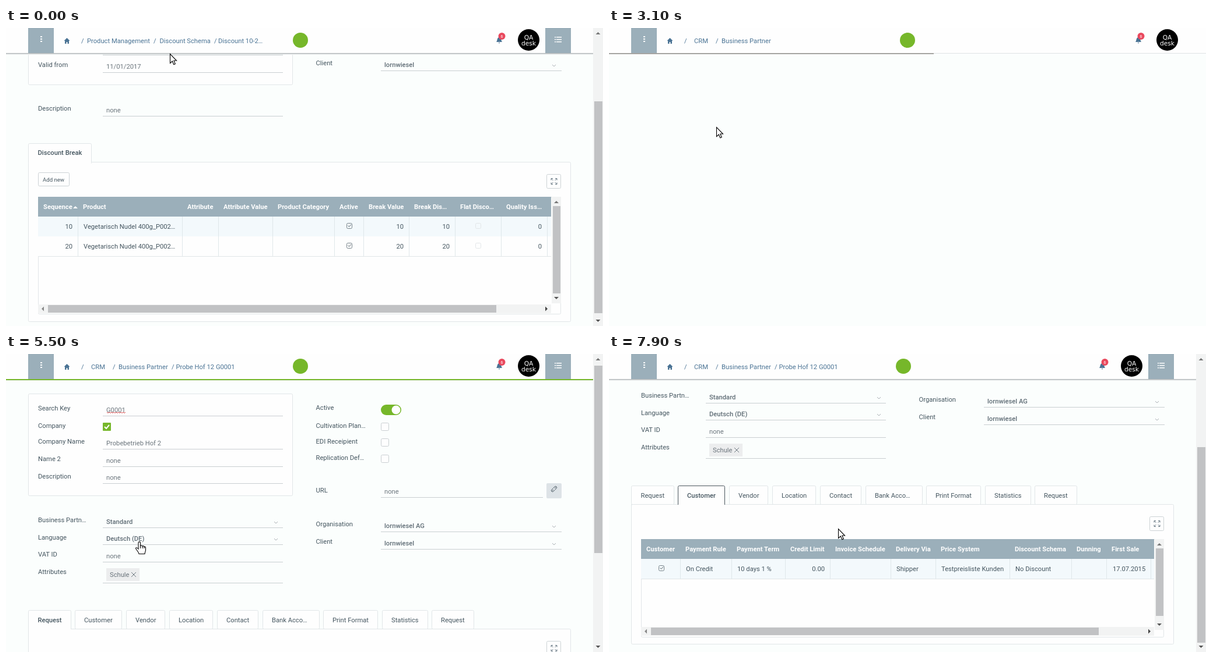
An HTML page that plays this animation: 1024x512 px, repeating every 8 s.

```html
<!DOCTYPE html>
<html lang="en">
<head>
<meta charset="utf-8">
<title>Business partner walkthrough</title>
<style>
html, body { margin: 0; width: 100%; height: 100%; overflow: hidden; background: #fbfefd; }
svg { display: block; width: 1024px; height: 512px; font: 11.2px Roboto, sans-serif; fill: #44555f; }
.bold { font-weight: 500; }
.head { font-weight: 700; fill: #fff; }
.value { fill: #6b757c; }
.pick { fill: #5f6c75; font-weight: 500; }
.link { fill: #4a7394; }
.title { font-weight: 500; fill: #66757f; }
.small { font-size: 9.6px; }
.tiny { font-size: 9px; }
.end { text-anchor: end; }
.mid { text-anchor: middle; }
.line { text-decoration: underline; }
.avatar { font: 10.6px "DejaVu Sans", sans-serif; fill: #fff; text-anchor: middle; }
</style>
</head>
<body>
<svg id="stage" viewBox="0 0 1024 512"></svg>
<script>
const LOOP = 8000, SLATE = '#9bafba', EDGE = '#e1e6e8', RULE = '#c9ced1', GREEN = '#76b72a', BLUE = '#4a7394';
const FIRM = 'lornwiesel', PARTNER = 'Probe Hof 12';

// Shapes; boxes are given by two corners, text by its left end and middle height.
const rect = (x, y, x2, y2, fill, more = '') =>
  `<rect x="${x}" y="${y}" width="${x2 - x}" height="${y2 - y}" fill="${fill}" ${more}/>`;
const box = (x, y, x2, y2, stroke = EDGE, fill = '#fefefe', rx = 2) =>
  rect(x + .5, y + .5, x2 - .5, y2 - .5, fill, `stroke="${stroke}" rx="${rx}"`);
const text = (x, y, s, cls = '') => `<text x="${x}" y="${y + 4}" class="${cls}">${s}</text>`;
const path = (x, y, d, stroke, fill = 'none', width = 1) =>
  `<path transform="translate(${x} ${y})" d="${d}" stroke="${stroke}" fill="${fill}" stroke-width="${width}"/>`;
const circle = (x, y, r, fill) => `<circle cx="${x}" cy="${y}" r="${r}" fill="${fill}"/>`;
const rule = (x, x2, y, color = RULE) => rect(x, y, x2, y + 1, color);
const each = (list, fn) => list.map(fn).join('');

const chevron = (x, y) => path(x, y, 'M-3-1 0 2 3-1', '#a9b0b4');
const lens = (x, y) => path(x, y, 'M2 2 5 5M2.5-.5a3 3 0 1 1-6 0a3 3 0 1 1 6 0', '#7c868c');
const ticked = (x, y) => box(x - 5, y - 5, x + 5, y + 5, '#77838a', 'none') + path(x, y, 'M-2.5-.5-.5 1.5 3-2.5', '#4f5c64');
const faint = (x, y) => box(x - 5, y - 5, x + 5, y + 5, '#e2e6e8', 'none');
const expand = y => box(927, y, 952, y + 25, '#ccd2d5') +
  path(940, y + 12.5, 'M-5-2V-5H-2M2-5H5V-2M5 2V5H2M-2 5H-5V2M-4.5-4.5-1.5-1.5M4.5-4.5 1.5-1.5M4.5 4.5 1.5 1.5M-4.5 4.5-1.5 1.5', '#687984');

function vbar(x, w, y, y2, from, to) {
  const c = x + w / 2;
  return rect(x, y, x + w, y2, '#f2f3f3') + rect(x + 2, from, x + w - 1, to, '#c1c2c4') +
    path(c, y + 9, 'M-4 2H4L0-2Z', 'none', '#777') + path(c, y2 - 9, 'M-4-2H4L0 2Z', 'none', '#555');
}
function hbar(y, x, x2, from, to) {
  return rect(x, y, x2, y + 15, '#f2f3f3') + rect(from, y + 1, to, y + 14, '#c1c2c4') +
    path(x + 8, y + 7.5, 'M2-4V4L-2 0Z', 'none', '#888') + path(x2 - 8, y + 7.5, 'M-2-4V4L2 0Z', 'none', '#444');
}

// Cells: true and false are check boxes; a negative x aligns text to the right at -x.
function cell(x, y, v) {
  if (v === true) return ticked(x, y - 1);
  if (v === false) return faint(x, y - 1);
  return text(Math.abs(x), y, v, x < 0 ? 'end' : '');
}
function grid(x, x2, y, heads, cols, seps, rows, hover = -1, border = EDGE) {
  const base = y + 34;
  return rect(x, y, x2, base, SLATE) +
    each(heads, ([hx, s]) => text(hx, y + 17, s, 'head')) +
    each(rows, (row, i) => {
      const top = base + i * 34;
      return rect(x, top, x2, top + 34, i === hover ? '#d7e4ed' : i % 2 ? '#fefefe' : '#f3f9fc') +
        rule(x, x2, top + 34, border) +
        each(row, (v, k) => cell(cols[k], top + 17, v));
    }) +
    each(seps, s => rect(s, base, s + 1, base + rows.length * 34, '#dfe7ea'));
}

function header(crumbs, wide) {
  const logo = wide ? 512 : 505, bell = wide ? 908 : 846, face = wide ? 957.5 : 896.5;
  const right = wide ? 1024 : 1007;
  return rect(0, 0, right, 43, '#fefefe') +
    (wide ? rule(0, right, 43, '#dfe3e5')
      : rule(0, right, 43, '#b4b8ba') + rule(0, right, 44, '#d4d8d9') + rule(0, right, 45, '#eef1f1')) +
    rect(38, 0, 82, 43, SLATE) + each([14, 18, 22], y => rect(59, y, 62, y + 2, '#fff')) +
    path(104.5, 22, 'M-5 0 0-5 5 0H3.5V5H1V2H-1V5H-3.5V0Z', 'none', BLUE) +
    each(crumbs, ([x, s]) => text(x, 22, s, 'link')) +
    circle(logo, 21, 13, GREEN) +
    path(bell, 20, 'M-5 4C-3 2-4-4 0-4S3 2 5 4ZM-1.5 5H1.5L0 6.5Z', 'none', BLUE) +
    circle(bell + 4.5, 14, 6, '#e9485d') +
    `<text x="${bell + 4.5}" y="16.5" fill="#fff" class="mid" style="font-size:7px">6</text>` +
    circle(face, 20.5, 18.5, '#000') + text(face, 16, 'QA', 'avatar') + text(face, 26, 'desk', 'avatar') +
    (wide ? '' : rect(925, 0, 969, 43, SLATE) +
      each([15, 19, 23], y => rect(941, y, 943, y + 1.5, '#fff') + rect(944, y, 953, y + 1.5, '#fff')));
}

const field = (y, label, value, cls = 'value', dy = 3) =>
  text(55, y, label) + text(172, y + dy, value, cls) + rule(166, 475, y + dy + 10) +
  (cls === 'pick' ? chevron(463, y + dy + 1) : '');
const rightPick = (y, label, value) =>
  text(531.5, y, label) + text(649, y + 3, value, 'pick') + rule(643, 953, y + 13) + chevron(940, y + 4);

function schemaPage() {
  const heads = [[64, 'Sequence'], [132, 'Product'], [311, 'Attribute'], [373, 'Attribute Value'], [466, 'Product Category'],
    [572, 'Active'], [622, 'Break Value'], [700, 'Break Dis…'], [779, 'Flat Disco…'], [858, 'Quality Iss…']];
  const cols = [-114, 133, 589, -682, -761, 810, -919];
  const rows = ['10', '20'].map(n => [n, 'Vegetarisch Nudel 400g_P002…', true, n, n, false, '0']);
  return box(38, 20, 492, 98) + rule(166, 475, 46) + field(63, 'Valid from', '11/01/2017') +
    field(138, 'Description', 'none') + rightPick(60, 'Client', FIRM) +
    box(38, 230, 969, 505) + box(38, 198, 147, 234) + rect(39, 230, 146, 235, '#fefefe') +
    text(54.5, 214, 'Discount Break', 'bold') +
    box(55, 248, 109, 272, '#ccd2d5') + text(63, 260, 'Add new', 'small') + expand(251) +
    box(55, 290, 952, 492) +
    grid(55, 935, 290, heads, cols, [123, 302, 364, 457, 563, 613, 691, 770, 849, 928], rows) +
    path(119, 308, 'M-4 2H4L0-2Z', 'none', '#fff') +
    vbar(936, 16, 290, 473, 306, 456) + hbar(475, 55, 935, 72, 841) +
    header([[129, '/'], [139, 'Product Management'], [253, '/'], [263.5, 'Discount Schema'], [357, '/'], [364, 'Discount 10-2…']]) +
    vbar(1007, 17, 0, 512, 126, 490);
}

// Menu lines: the number of leading dashes is the indent; "=" marks the hovered entry.
const MENU = [[134, ['-New Business Partner', '-New Request', '-Business Partner', '-Request', '-Outbound Documents', '-Settings',
  '--Greeting', '--Outbound Documents Config', '--Payment Term', '--Partner Relation', '--Business Partner Group', '--Request Type']],
  [348, ['-New Product', '-Product', '-Attribute', '-Attribute Set', '-Bill of Materials', '-Discount Schema']],
  [466, ['-New Sales Order']]];
const TITLES = [[68, 'DASHBOARD'], [91, 'BROWSE WHOLE TREE'], [118, 'CRM'], [332, 'PRODUCT MANAGEMENT'], [450, 'SALES']];

function menu(hover) {
  return each([1, 2, 3, 4], d => rect(82 - d, 44, 588 + d, 491 + d, '#000', 'opacity=".07" rx="2"')) +
    rect(82, 43, 588, 491, '#fcfefe') + rect(82, 0, 126, 46, '#fefefe', 'opacity="0"') +
    rect(82, 0, 83, 44, EDGE) + rect(125, 0, 126, 44, EDGE) +
    each(TITLES, ([y, s]) => text(98.5, y, s, 'title')) +
    each(MENU, ([top, items]) => each(items, (s, i) => {
      const name = s.replace(/^-+/, ''), x = 98.5 + 12.8 * (s.length - name.length);
      return text(x, top + i * 16, name, 'link' + (hover && name === 'Business Partner' ? ' line' : ''));
    })) +
    box(290, 57, 539, 79, '#cdd3d6') + lens(303, 68) + text(312.5, 68, 'Type phrase here', 'value') +
    vbar(570, 16, 44, 473, 60, 233) + hbar(475, 82, 569, 99, 551);
}

function listPage(t, cursor) {
  const head = header([[129, '/'], [146, 'CRM'], [183, '/'], [193, 'Business Partner']], true);
  if (t < 3300) return head;
  const heads = [[48, 'Search Key'], [137, 'Name'], [347, 'Name 2'], [481, 'Active'], [551, 'Company'], [628, 'Business Partner Group'], [840, 'Language']];
  const names = [['1000006', 'dbdemo'], ['1000004', 'jonsdemo'], ['1000005', 'jonsdrittabo'], [FIRM, FIRM + ' AG'], ['1000001', 'pk_demo01'],
    ['G0001', PARTNER], ['G0002', 'Probe Molkerei 2'], ['1000003', 'probe team'], ['1000002', 'x207']];
  const rows = names.map(([key, name], i) => [key, name, true, i !== 7,
    i === 6 ? 'Gemüse- und Früchtelieferanten Inland' : 'Standard', i === 1 ? 'English (US)' : 'Deutsch (DE)']);
  const full = t >= 3700, hover = Math.floor((cursor.y - 133) / 34);
  return rect(38, 44, 986, 512, '#fdfefe') + text(54.5, 69, 'Filters:') +
    box(91, 58, 142, 81, '#ccd2d5') + lens(104, 68) + text(112, 69.5, 'Filter', 'small') +
    box(38, 98, 986, 458) +
    grid(39, 967, 99, heads, [49.5, 138, 508, 581, 629, 841], full ? [128, 338, 472, 542, 619, 831] : [], full ? rows : [], hover, 'none') +
    path(334, 117, 'M-4 2H4L0-2Z', 'none', '#fff') +
    vbar(968, 16, 98, 439, 115, 422) + hbar(441, 38, 967, 55, 950) +
    (full ? text(51, 477.5, 'items selected', 'tiny') + text(51, 490.5, 'Select all on this page', 'tiny line') +
      text(834, 483, 'Total items 9', 'tiny') + box(902, 471, 973, 496, '#d9dee1') + rect(925, 471, 950, 496, SLATE) +
      text(914, 483, '«', 'tiny mid') + text(937, 483, '1', 'tiny mid head') + text(961, 483, '»', 'tiny mid') : '') +
    head;
}

const TABS = [[38, 112, 54.5, 'Request'], [118, 199, 134, 'Customer'], [206, 273, 222, 'Vendor'], [280, 355, 296, 'Location'], [362, 433, 378, 'Contact'],
  [440, 538, 456, 'Bank Acco…'], [544, 638, 560, 'Print Format'], [645, 724, 661, 'Statistics'], [730, 803, 746, 'Request']];

function detailTable(customer, filled) {
  const shift = filled ? 42 : 0, end = filled ? 705 : 750;
  const heads = [[64, 'Customer'], [131, 'Payment Rule'], [219, 'Payment Term'], [311, 'Credit Limit'], [388, 'Invoice Schedule'], [492, 'Delivery Via'],
    [569, 'Price System'], [654 + shift, 'Discount Schema'], [760 + shift, 'Dunning'], [820 + shift, 'First Sale']];
  if (!filled) heads.push([885, 'Organisation']);
  const row = [true, 'On Credit', '10 days 1 %', '0.00', 'Shipper', 'Testpreisliste Kunden', 'No Discount', '17.07.2015'];
  return box(55, 532, 952, end - 4) +
    grid(55, 935, 532, customer ? heads : [], [90, 132, 220, -370, 493, 570, 697, 864],
      filled ? [122, 210, 302, 379, 483, 560, 687, 793, 853, 929] : [], filled ? [row] : []) +
    (filled ? '' : `<g style="font-size:16px">${text(495, 631, 'There are no detail rows', 'bold mid')}</g>` +
      text(495, 652, 'You can create them in this window.', 'mid value')) +
    vbar(936, 16, 532, end - 17, 548, end - 41) + hbar(end - 22, 55, 935, 72, filled ? 840 : 895);
}

function detailPage(t) {
  const customer = t >= 6700, filled = t >= 7100;
  const scroll = filled ? 214 : ramp(t, 5900, 6500) * 242;
  const panelEnd = filled ? 713 : 765;
  const option = (y, label) => text(531.5, y, label) + box(643, y - 5, 657, y + 9, RULE);
  const form = box(38, 68, 492, 244) +
    field(93, 'Search Key', 'G0001') + path(173, 100, 'M0 0' + 'l2 1.5 2-1.5'.repeat(8), '#e05050') +
    text(55, 123, 'Company') + rect(166, 118, 180, 132, GREEN, 'rx="1"') + path(173, 125, 'M-4 0-1 3 4-3', '#fff', 'none', 2) +
    field(150, 'Company Name', 'Probebetrieb Hof 2') + field(180, 'Name 2', 'none') + field(210, 'Description', 'none', 'value', 2) +
    field(285, 'Business Partn…', 'Standard', 'pick') + field(315, 'Language', 'Deutsch (DE)', 'pick', 2) + field(344, 'VAT ID', 'none') +
    text(55, 374, 'Attributes') + rect(172, 368, 229, 390, '#ecedee') + text(178, 379, 'Schule', 'value') +
    path(219, 379, 'M-4-4 4 4M4-4-4 4', '#6d7880') + rule(166, 475, 393) +
    text(531.5, 92, 'Active') + rect(643, 87, 678, 105, GREEN, 'rx="9"') + circle(669, 96, 7.5, '#fff') +
    option(123, 'Cultivation Plan…') + option(150, 'EDI Receipient') + option(178, 'Replication Def…') +
    text(531.5, 234, 'URL') + text(649, 236, 'none', 'value') + rule(643, 921, 246) +
    rect(927, 222, 953, 248, '#dde3e7', 'rx="2"') +
    path(940, 232, 'M-1 1-4 4M1-1 4-4M-1.5-1.5 1-4a2 2 0 0 1 3 3L1.5 1.5M1.5 1.5-1 4a2 2 0 0 1-3-3L-1.5-1.5', '#53616a') +
    rightPick(292, 'Organisation', FIRM + ' AG') + rightPick(322, 'Client', FIRM) +
    box(38, 472, 969, panelEnd) +
    each(TABS, ([x, x2, tx, s], i) => {
      const on = i === (customer ? 1 : 0);
      return box(x, 440, x2, on ? 476 : 473, on && customer ? '#4a555c' : EDGE) +
        (on ? rect(x + 1, 472, x2 - 1, 477, '#fefefe') + rect(x, 473, x2, 477, '#fefefe') : '') + text(tx, 457, s, on ? 'bold' : '');
    }) + rect(38, 472, 39, 478, EDGE) + expand(493) + detailTable(customer, filled);
  const top = filled ? 160 : 20 + scroll * .616;
  return (t < 5300 ? '' : `<g transform="translate(0 ${-scroll})">${form}</g>`) +
    header([[129, '/'], [146, 'CRM'], [183, '/'], [193, 'Business Partner'], [284, '/ ' + PARTNER + ' G0001']]) +
    vbar(1007, 17, 0, 512, top, top + (filled ? 336 : scroll ? 316 : 322));
}

const ramp = (t, a, b) => Math.min(1, Math.max(0, (t - a) / (b - a)));

const TRAIL = [[0, 281, 44], [100, 281, 44], [700, 104, 20], [1100, 104, 20], [1900, 184, 170], [3700, 184, 170], [4500, 229, 321],
  [6100, 229, 321], [6700, 172, 216], [7100, 172, 216], [7700, 393, 300], [8000, 393, 300]];
function cursorAt(t) {
  const i = TRAIL.findIndex(k => k[0] > t), [a, x, y] = TRAIL[i - 1], [b, x2, y2] = TRAIL[i], p = ramp(t, a, b);
  return { x: x + (x2 - x) * p, y: y + (y2 - y) * p };
}
function pointer({ x, y }, hand) {
  return hand
    ? path(x, y + 2, 'M-2 1.5C-2-1 1.5-1 1.5 1.5V7C2 5.5 5 5.5 5 7.5C6 6 8 7 8 8.5C9.5 7.5 10.5 8.5 10.5 10V14C10.5 16 9 18 9 20.5H-1C-1 18-4 15-6 12C-7.5 9.5-4.5 8.5-2 12ZM1.5 7V11M5 7.5V11M8 8.5V11', '#000', '#fff', 1.1)
    : path(x + .5, y + .5, 'M0 0V16L3.8 12.5 6.3 18.3 8.8 17.2 6.4 11.5H11Z', '#000', '#fff', 1.1);
}

// A bar below the header grows while loading and turns green when done.
function progress(t) {
  const bar = (w, color) => rect(0, 43, w, 45, color);
  if (t >= 2500 && t < 3700) return bar((t - 2500) / 600 * 557, '#a5a4a1');
  if (t >= 3700 && t < 3900) return bar(1024, GREEN);
  if (t >= 5100 && t < 5500) return bar((t - 4900) * 2, '#a5a4a1');
  if (t >= 5500 && t < 5700) return bar(1007, GREEN);
  return '';
}

function scene(t) {
  const cursor = cursorAt(t);
  const hand = [[700, 2500], [5300, 6100], [6500, 7300]].some(([a, b]) => t >= a && t < b);
  const page = t < 2500 ? schemaPage() + (t >= 900 ? menu(t >= 1900) : '')
    : t < 5100 ? listPage(t, cursor) : detailPage(t);
  return page + progress(t) + pointer(cursor, hand);
}

const stage = document.getElementById('stage');
let shown = -1;
function draw() {
  const now = performance.now() % LOOP;
  const t = Math.max(0, Math.floor((now + 100) / 200) * 200 - 100);
  if (t !== shown) stage.innerHTML = scene(shown = t);
  requestAnimationFrame(draw);
}
draw();
</script>
</body>
</html>
```
